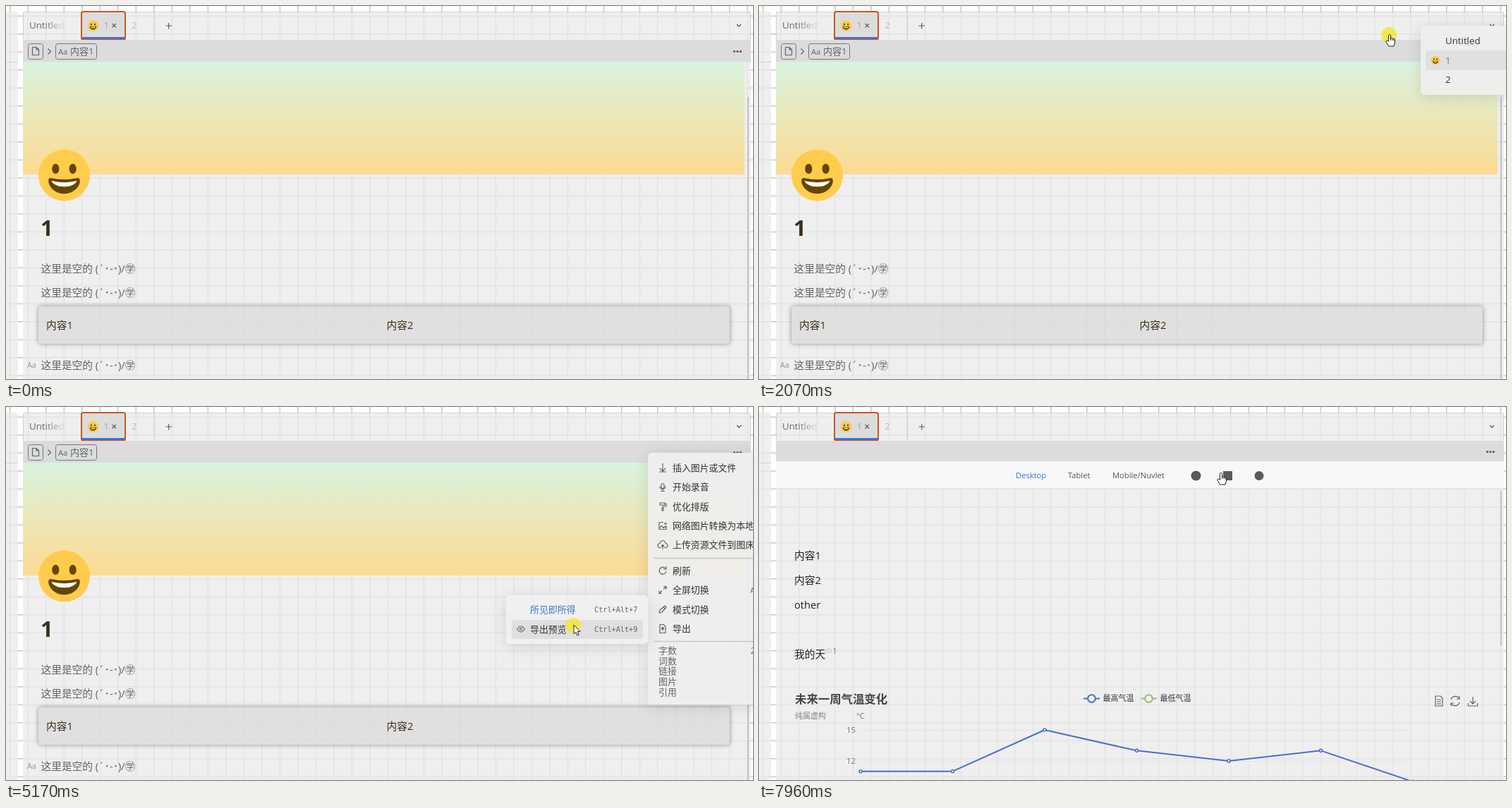
Recreate the animation shown at these times as an HTML page. Size 1059 by 529 pixels, loop 8 s.

```html
<!DOCTYPE html>
<html lang="zh">
<head>
<meta charset="utf-8">
<title>Editor preview</title>
<style>
  html, body { margin: 0; width: 100%; height: 100%; overflow: hidden; background: #fff; }
  svg { display: block; width: 1059px; height: 529px; }
  text { font-family: "Open Sans", "Noto Sans CJK SC", "Noto Sans CJK", sans-serif; white-space: pre; }
  .mono { font-family: "DejaVu Sans Mono", monospace; }
  .popup { filter: drop-shadow(0 3px 10px rgba(0,0,0,.13)); }
  .block { filter: drop-shadow(0 0 3px rgba(0,0,0,.4)); }
</style>
</head>
<body>
<svg id="stage" viewBox="0 0 1059 529" xmlns="http://www.w3.org/2000/svg"></svg>
<script>
const LOOP = 8000;
const INK = '#5f6368', DARK = '#333', BLUE = '#4472c9';

// Drawing helpers; text is placed by its vertical centre.
const text = (x, cy, str, size = 14.7, fill = DARK, extra = '') =>
  `<text x="${x}" y="${cy + size * .36}" font-size="${size}" fill="${fill}" ${extra}>${str}</text>`;
const rect = (x, y, w, h, fill, extra = '') =>
  `<rect x="${x}" y="${y}" width="${w}" height="${h}" fill="${fill}" ${extra}/>`;
const line = (d, stroke = INK, width = 1.2, extra = '') =>
  `<path d="${d}" fill="none" stroke="${stroke}" stroke-width="${width}" ${extra}/>`;
const circle = (x, y, r, fill, extra = '') =>
  `<circle cx="${x}" cy="${y}" r="${r}" fill="${fill}" ${extra}/>`;
const group = (id, body, extra = '') => `<g id="${id}" ${extra}>${body}</g>`;
const icon = (x, y, d) => line(d, INK, 1.2, `transform="translate(${x} ${y})" stroke-linejoin="round"`);

const smiley = (x, y, r) => `<g transform="translate(${x} ${y}) scale(${r / 18})">
  ${circle(0, 0, 18, '#ffcc4d')}
  <g fill="#664500"><ellipse cx="-6" cy="-4.5" rx="2.5" ry="3.5"/><ellipse cx="6" cy="-4.5" rx="2.5" ry="3.5"/>
  <path d="M0 3C-4 3-6 2.5-9 2-10 1.9-11 2-11 4-11 8-6.4 13 0 13S11 8 11 4C11 2 10 1.9 9 2 6 2.5 4 3 0 3Z"/></g>
  <path d="M-9 4Q0 6 9 4Q7 8 0 8T-9 4Z" fill="#fff"/></g>`;

const ICONS = {
  down: 'M0-6V5M-4 1L0 5L4 1M-5 6H5',
  mic: 'M-2-3a2 2 0 0 1 4 0v3a2 2 0 0 1-4 0ZM-4-1a4 4 0 0 0 8 0M0 3V6M-3 6H3',
  brush: 'M-4-5H3V-2H-4ZM3-4H5V0H0V2M-1 2H1V6H-1Z',
  image: 'M1-5H-5V5H5V0M-5 4L-2 0L1 3L3 1L5 3M2-3H6M4-5V-1',
  cloud: 'M-2 4H-4a3 3 0 0 1 0-6a4 4 0 0 1 8 0a3 3 0 0 1 0 6H2M0 6V0M-2 2L0 0L2 2',
  refresh: 'M4-3A5 5 0 1 0 5 1M5-6V-2H1',
  expand: 'M1-5H5V-1M5-5L1-1M-1 5H-5V1M-5 5L-1 1',
  pen: 'M-5 5L-4 1L3-5L5-3L-1 4ZM1-3L3-1',
  export: 'M-4-6H1L4-3V6H-4ZM0 3V-2M-2 0L0-2L2 0',
  doc: 'M-4.500-5.500H1L4.500-2V5.500H-4.500ZM1-5.500V-2H4.500',
  sheet: 'M-5-7H2L5-4V7H-5ZM-3-2H3M-3 1H3M-3 4H3',
  sync: 'M-6-2A6.500 6.500 0 0 1 6-3M6-7V-3H2M6 2A6.500 6.500 0 0 1-6 3M-6 7V3H-2',
  save: 'M0-6V4M-4 0L0 4L4 0M-6.500 3V7H6.500V3',
  eye: 'M-5.500 0Q0-8 5.500 0Q0 8-5.500 0ZM-1.500 0a1.500 1.500 0 1 0 3 0a1.500 1.500 0 1 0-3 0',
};
const dots = cy => [1032.500, 1037, 1041.500].map(x => circle(x, cy, 1.6, '#555')).join('');

function frameUi() {
  const panes = [[0, 8, 17, 521], [24, 8, 1032, 521]]
    .map(p => rect(...p, '#ebebeb', 'fill-opacity=".8"')).join('');
  return rect(0, 0, 1059, 529, '#fff') + rect(0, 0, 1059, 529, 'url(#grid)') + panes +
    line('M0 79.500H17M24.500 47V11Q24.500 8.500 28 8.500H1052Q1055.500 8.500 1055.500 12V47M210.500 9V47', '#d2d2d2', 1.2) +
    text(33, 27.5, 'Untitled', 13.3, 'url(#fade)') +
    rect(107, 8, 62, 40, '#dcdcdc', 'rx="3" stroke="#c6591f" stroke-width="2"') +
    rect(108, 44, 60, 3, BLUE) + smiley(123.500, 28, 7.8) +
    text(138.500, 27.5, '1', 13.3, '#a9a9a9') + line('M150.500 25L156 30.500M156 25L150.500 30.500') +
    text(178, 27.5, '2', 13.3, '#bcbcbc') +
    line('M226.500 28H235M230.700 24V32.500', '#52606f', 1.2) +
    line('M1036 26L1039 29L1042 26', '#555', 1.3);
}

function editor() {
  const empty = '这里是空的 (´･-･)/㊫';
  return rect(24, 48, 1032, 31, '#dcdcdc') +
    rect(31.500, 53.500, 21, 22, 'none', 'rx="3" stroke="#777"') + icon(42, 64, ICONS.doc) +
    line('M59.500 60.500L63.500 64.500L59.500 68.500') +
    rect(70.500, 53.500, 58, 22, 'none', 'rx="3" stroke="#777"') +
    text(74, 64.5, 'Aa', 11.2, INK) + text(91, 64.5, '内容1', 13, INK) + dots(64.500) +
    rect(24, 79, 1023, 160, 'url(#hero)') + rect(1051, 129, 2, 400, '#c2c2c2') +
    smiley(82.500, 240, 36.500) +
    text(49, 315, '1', 31, '#3a2f18', 'font-weight="700"') +
    [372.500, 407, 509.500].map(y => text(49.500, y, empty, 14.7, '#626262')).join('') +
    rect(46, 426, 980, 53, '#e0e0e0', 'rx="4" class="block"') +
    rect(46, 426, 980, 53, 'url(#grid)', 'opacity=".17"') +
    text(57, 453, '内容1', 14.7, '#3a2f18') + text(539.500, 453, '内容2', 14.7, '#3a2f18') +
    text(30, 509.500, 'Aa', 10.8, '#7f96b8');
}

function dropdown() {
  return rect(938, 28, 140, 98, '#f0f0f0', 'fill-opacity=".94" rx="5" class="popup"') +
    rect(945, 63, 130, 28, '#dfe0e2', 'rx="4"') + smiley(959, 77, 6.5) +
    text(973, 49, 'Untitled', 13.3) + text(973, 77, '1', 13.3, '#777') + text(973, 104, '2', 13.3);
}

const MENU = [
  [86, '插入图片或文件', 'down'], [113.500, '开始录音', 'mic'], [141, '优化排版', 'brush'],
  [168.500, '网络图片转换为本地图片', 'image'], [195.500, '上传资源文件到图床', 'cloud'],
  [232, '刷新', 'refresh'], [259.500, '全屏切换', 'expand'], [287, '模式切换', 'pen'], [314.500, '导出', 'export'],
];
function menu() {
  return rect(910, 65, 180, 357, '#f0f0f0', 'fill-opacity=".92" rx="5" class="popup"') +
    rect(918, 0, 160, 28, '#dfdfe0', 'id="menuHover" rx="4"') +
    MENU.map(([y, label, name]) => icon(931, y, ICONS[name]) + text(945, y, label, 12.9)).join('') +
    line('M918 214.500H1059M918 332.500H1059', '#c8c8c8', 1.3) +
    text(1055, 260, 'A', 10, INK) + text(1055.500, 345, '2', 12.9, INK) +
    ['字数', '词数', '链接', '图片', '引用'].map((s, i) => text(925, 345.500 + i * 14.6, s, 12.9, '#666')).join('');
}

function submenu() {
  return rect(709, 267, 201, 69, '#f1f1f1', 'fill-opacity=".95" rx="5" class="popup"') +
    rect(717, 0, 186, 27, '#dfdfe0', 'id="subHover" rx="4"') +
    text(743, 287, '所见即所得', 12.9, '#3f74d1') + text(743, 315, '导出预览', 12.9) +
    icon(730, 315, ICONS.eye) +
    text(834, 287, 'Ctrl+Alt+7', 10.2, INK, 'class="mono"') + text(834, 315, 'Ctrl+Alt+9', 10.2, INK, 'class="mono"');
}

function preview() {
  return rect(24, 48, 1032, 29, '#dcdcdc') + dots(63.500) +
    rect(24, 77, 1032, 38, '#f7f8fa') + line('M24 115.500H1056', '#e4e4e4', 1) +
    text(364, 97, 'Desktop', 11.2, BLUE) + text(438, 97, 'Tablet', 11.2, '#555') +
    text(501, 97, 'Mobile/Nuvlet', 11.2, '#555') +
    circle(619.500, 97.500, 7, '#5a5a5a') + rect(658, 91, 13, 13, '#5a5a5a') + circle(709, 97.500, 6.5, '#5a5a5a');
}

function article() {
  return rect(1051, 119, 2, 219, '#c2c2c2') +
    [[211, '内容1'], [246, '内容2'], [280.500, 'other'], [350.500, '我的天']]
      .map(([y, s]) => text(50, y, s, 14.7, '#222')).join('');
}
const footnote = () =>
  line('M96 348a2 2 0 0 1 0-4a3 3 0 0 1 5 0a2 2 0 0 1 0 4ZM98 346H100', '#c9c9c9', 1) + text(104.500, 346, '1', 10.5, '#3f74d1');

const TEMPS = [11, 11, 15, 13, 12, 13, 10];
const points = TEMPS.map((v, i) => [144 + i * 130.5, 458 + (15 - v) * 14.67]);
function chart() {
  const key = (x, color, label) => line(`M${x} 413.500h23`, color, 2) +
    circle(x + 11.500, 413.500, 5.3, '#f2f2f2', `stroke="${color}" stroke-width="2"`) + text(x + 27.500, 413, label, 11, DARK);
  return text(51, 414.500, '未来一周气温变化', 16.4, '#464646', 'font-weight="700"') +
    text(51, 438.500, '纯属虚构', 11, '#85868b') + text(138, 438.500, '°C', 11, '#6e7079') +
    text(137, 457.500, '15', 11.3, '#6e7079', 'text-anchor="end"') + text(137, 501.500, '12', 11.3, '#6e7079', 'text-anchor="end"') +
    line('M144 458.500H927M144 502.500H927', '#e0e4ee', 1) +
    key(460, BLUE, '最高气温') + key(541, '#9dbb7c', '最低气温') +
    icon(964, 417, ICONS.sheet) + icon(987, 417, ICONS.sync) + icon(1012, 417, ICONS.save) +
    group('series', line('M' + points.map(p => p.join(' ')).join('L'), '#4c6fcb', 2, 'stroke-linejoin="round"') +
      points.map(([x, y]) => circle(x, y, 2, '#fff', 'stroke="#4c6fcb" stroke-width="1.6"')).join(''), 'clip-path="url(#reveal)"');
}

const pointer = () => group('cursor',
  circle(-1, 1, 11, '#f3e72c', 'id="click" fill-opacity=".8"') +
  '<path id="arrow" d="M0 0V13L3 10.300L5 15L7.200 14L5.200 9.500H9Z" fill="#fff" stroke="#222"/>' +
  `<path id="hand" d="M-1.500 1.500Q0-1 1.500 1.500V6Q3 5 4 6.300Q5.500 5.500 6 7Q8 6.500 7.500 9V12L6 17H-1.500
    L-5 11Q-5.500 8-2.500 9.500L-1.500 10.500ZM1.500 6V9M4 6.500V9M6 7.500V9.500" fill="#fff" stroke="#222"/>`);

document.getElementById('stage').innerHTML = `<defs>
  <pattern id="grid" x="5" y="13.5" width="25.5" height="25.5" patternUnits="userSpaceOnUse">
    <path d="M.75 0V25.5M0 .75H25.5" stroke="#c6c6c6" stroke-width="1.5"/></pattern>
  <linearGradient id="hero" x2="0" y2="1"><stop stop-color="#daf3df"/><stop offset="1" stop-color="#fcdb92"/></linearGradient>
  <linearGradient id="fade" gradientUnits="userSpaceOnUse" x1="55" x2="86"><stop stop-color="#666"/><stop offset="1" stop-color="#666" stop-opacity="0"/></linearGradient>
  <clipPath id="reveal"><rect id="revealBox" x="138" y="430" width="0" height="110"/></clipPath></defs>` +
  frameUi() + group('editor', editor()) + group('preview', preview()) + group('article', article()) +
  group('footnote', footnote()) + group('chart', chart()) +
  group('arrows', line('M1026.500 279L1032 273L1037.500 279M1026.500 477L1032 483L1037.500 477', '#bdbdbd', 2)) +
  group('dropdown', dropdown()) + group('menu', menu()) + group('submenu', submenu()) + pointer();

const $ = id => document.getElementById(id);
const show = (id, on) => $(id).setAttribute('visibility', on ? 'inherit' : 'hidden');
const within = (t, ...spans) => spans.some(([a, b]) => t >= a && t < b);

// Pointer path: time, x, y
const PATH = [
  [70, 1002, 522], [300, 1030, 300], [610, 1037, 80], [820, 1037, 46], [1000, 1039, 27], [1250, 1039, 27],
  [1650, 900, 42], [2070, 894, 40], [2180, 894, 40], [2480, 1036, 63], [2720, 1036, 63], [2900, 1010, 110],
  [3110, 1003, 154], [3460, 1003, 157], [3720, 985, 287], [3900, 975, 314], [4280, 975, 314],
  [4350, 970, 290], [4550, 965, 288], [4850, 850, 290], [5100, 805, 309], [5240, 805, 309],
  [5320, 794, 316], [5670, 698, 330], [5870, 698, 330], [6080, 642, 207], [6450, 630, 110], [6630, 625, 93],
  [7000, 700, 94], [7470, 545, 95], [7600, 528, 94], [7960, 655, 93],
];
const ease = p => p < .5 ? 4 * p ** 3 : 1 - (2 - 2 * p) ** 3 / 2;
function pointerAt(t) {
  const i = PATH.findIndex(k => k[0] > t);
  if (i < 1) return (i ? PATH[PATH.length - 1] : PATH[0]).slice(1);
  const [t0, x0, y0] = PATH[i - 1], [t1, x1, y1] = PATH[i], p = (t - t0) / (t1 - t0);
  return [x0 + (x1 - x0) * p, y0 + (y1 - y0) * p];
}

function render(t) {
  const [x, y] = pointerAt(t);
  const PREVIEW_AT = 5280, CHART_AT = 6600;
  show('editor', t < PREVIEW_AT);
  show('preview', t >= PREVIEW_AT);
  show('article', t >= 6400);
  show('chart', t >= CHART_AT);
  show('footnote', t >= 6700);
  show('arrows', within(t, [210, 750]));
  show('dropdown', within(t, [1120, 2150]));

  const menuOpen = within(t, [2640, PREVIEW_AT]);
  const subOpen = within(t, [3720, 3880], [4320, PREVIEW_AT]);
  show('menu', menuOpen);
  show('submenu', subOpen);
  const hovered = MENU.find(([cy]) => Math.abs(cy - y) < 13.8 + (cy === 141 ? 3 : 0));
  show('menuHover', menuOpen && x > 910 && hovered);
  if (hovered) $('menuHover').setAttribute('y', hovered[0] - 14);
  show('subHover', subOpen && x < 905);
  $('subHover').setAttribute('y', y > 301 ? 302 : 274);

  $('revealBox').setAttribute('width', 800 * ease(Math.min(1, Math.max(0, (t - CHART_AT) / 1360))));

  const hand = within(t, [930, 5080], [6580, LOOP]);
  show('cursor', t >= 70);
  show('hand', t >= 70 && hand);
  show('arrow', t >= 70 && !hand);
  show('click', within(t, [1040, 1180], [2030, 2170], [2550, 2690], [5110, 5250]));
  $('cursor').setAttribute('transform', `translate(${x} ${y})`);
}

function tick() {
  render(performance.now() % LOOP);
  requestAnimationFrame(tick);
}
tick();
</script>
</body>
</html>
```
